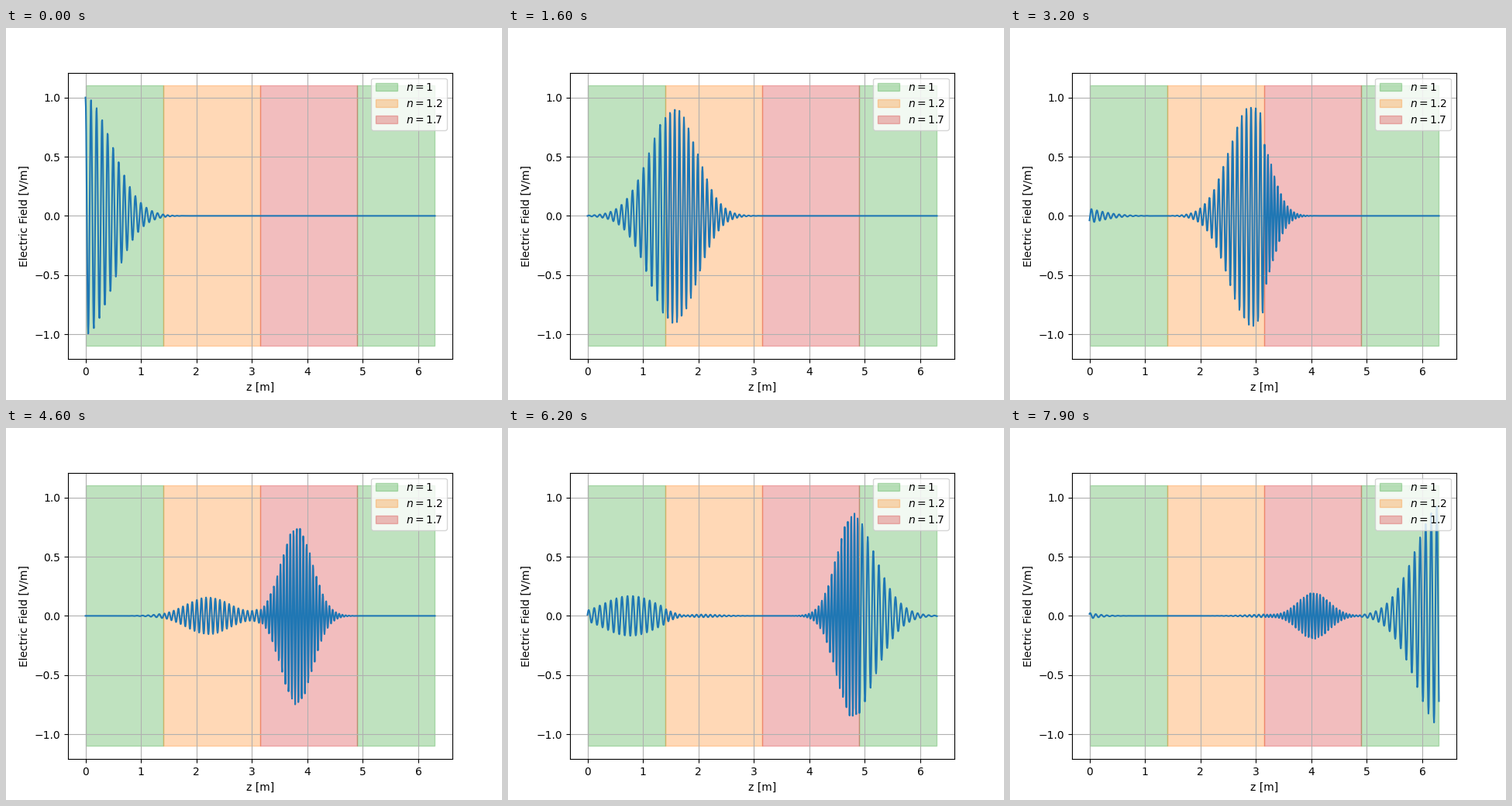
A matplotlib script that plays this animation: 640 px wide and 480 px high, repeating every 8 s.

```python
import numpy as np
import matplotlib.pyplot as plt
from matplotlib.animation import FuncAnimation

FRAMES = 80
INTERVAL = 100
STEP = 0.100457              # light path travelled per frame [m]

EDGES = [0, 1.4, 3.15, 4.9, 6.3]
INDEX = [1, 1.2, 1.7, 1]
COLORS = {1: "C2", 1.2: "C1", 1.7: "C3"}

K = 2 * np.pi / 0.1          # vacuum wavenumber
SIGMA_K = K / 30             # spectral width of the pulse

z = np.linspace(0, EDGES[-1], 1001)
layer_of = np.clip(np.searchsorted(EDGES, z, side="right") - 1, 0, len(INDEX) - 1)


def pulse(u):
    return np.exp(-(SIGMA_K * u) ** 2 / 2) * np.cos(K * u)


def trace(layer, direction, path, amp, rays):
    """Follow a pulse through the stack, splitting it at every interface."""
    if abs(amp) < 5e-4 or path > FRAMES * STEP + 2.5:
        return rays
    rays.append((layer, direction, path, amp))
    n1 = INDEX[layer]
    path += n1 * (EDGES[layer + 1] - EDGES[layer])
    neighbour = layer + direction
    if 0 <= neighbour < len(INDEX):
        n2 = INDEX[neighbour]
        trace(neighbour, direction, path, amp * 2 * n1 / (n1 + n2), rays)
        trace(layer, -direction, path, amp * (n1 - n2) / (n1 + n2), rays)
    return rays


RAYS = trace(0, 1, 0, 1, [])


def field(ct):
    e = np.zeros_like(z)
    for layer, direction, path, amp in RAYS:
        inside = layer_of == layer
        start = EDGES[layer] if direction > 0 else EDGES[layer + 1]
        e[inside] += amp * pulse(ct - path - INDEX[layer] * np.abs(z[inside] - start))
    return e


fig, ax = plt.subplots(figsize=(6.4, 4.8), dpi=100)

for n, color in COLORS.items():
    label = f"$n={n}$"
    for i, ni in enumerate(INDEX):
        if ni == n:
            ax.fill_between(EDGES[i:i + 2], -1.1, 1.1, color=color, alpha=0.3, label=label)
            label = None

line, = ax.plot(z, field(0), color="C0")
ax.set_xlim(-0.05 * EDGES[-1], 1.05 * EDGES[-1])
ax.set_ylim(-1.21, 1.21)
ax.set_xlabel("z [m]")
ax.set_ylabel("Electric Field [V/m]")
ax.grid()
ax.legend(loc="upper right")


def update(frame):
    line.set_ydata(field(frame * STEP))
    return line,


anim = FuncAnimation(fig, update, frames=FRAMES, interval=INTERVAL,
                     repeat=True, repeat_delay=0)
plt.show()
```
